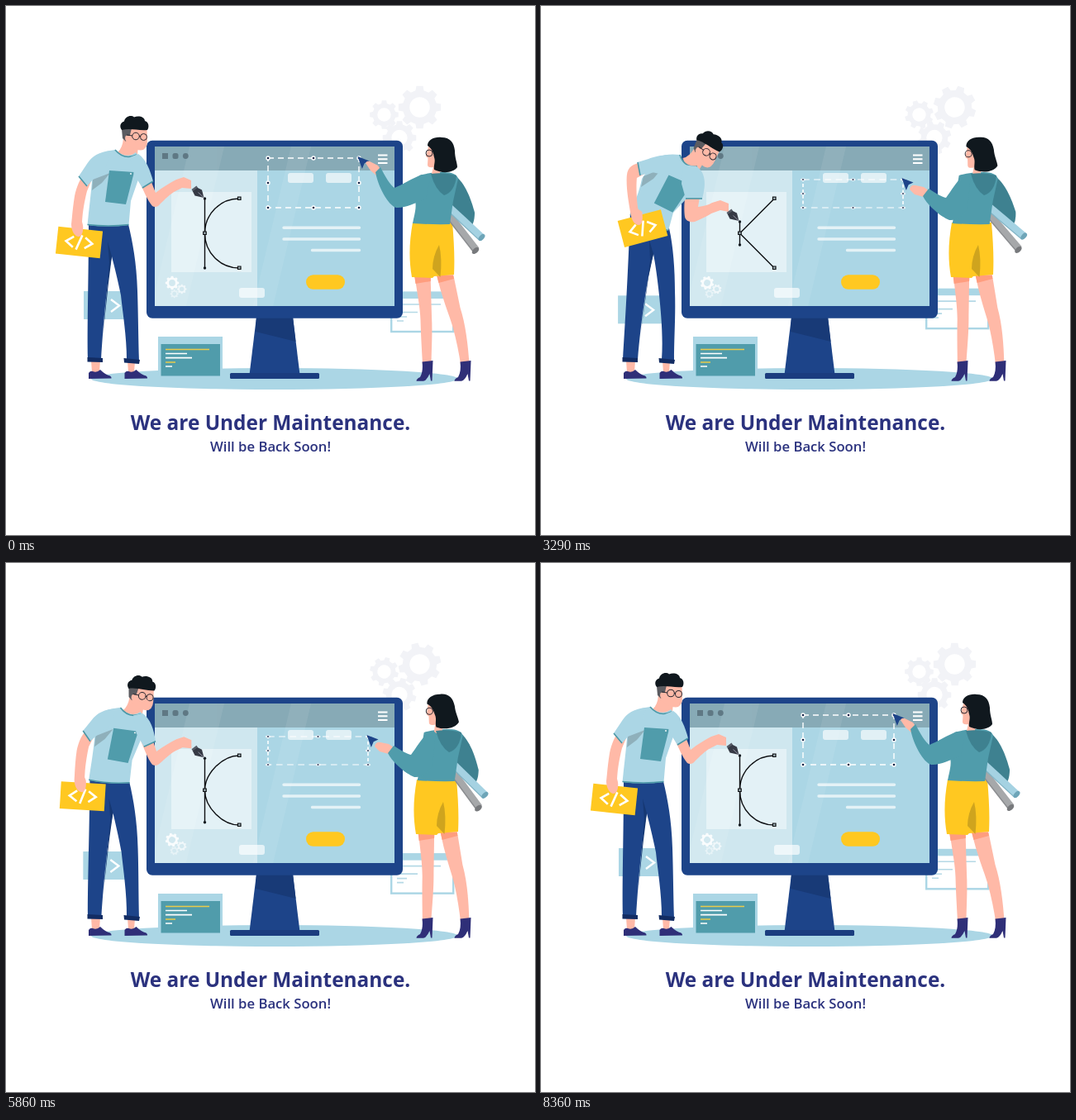
An HTML page that plays this animation: 640 by 640 pixels, repeating every 8430 ms.

```html
<!DOCTYPE html>
<html lang="en">
<head>
<meta charset="utf-8">
<title>Under maintenance</title>
<style>
  html, body { margin: 0; width: 100%; height: 100%; overflow: hidden; background: #fff; }
  svg { display: block; width: 100vw; height: 100vh; }
  text { font-family: "Open Sans", "Noto Sans", sans-serif; fill: #2b327e; text-anchor: middle; }
  .skin { fill: #ffb9a7; }
  .pale { fill: #abd6e5; }
  .teal { fill: #509cab; }
  .dusk { fill: #3e8190; }
  .navy { fill: #1d4489; }
  .gold { fill: #ffc821; }
  .ink { fill: #10181e; }
  .shoe { fill: #2f2f78; }
  .trim { fill: none; stroke: #4b97a6; stroke-width: 1.6; }
  .white { fill: none; stroke: #fff; }
  .pen { fill: none; stroke: #0d0f12; stroke-width: 1.4; }
  .glasses { fill: none; stroke: #2b2b33; }
</style>
</head>
<body>
<svg viewBox="0 0 640 640">
  <g id="backGears" fill="#f2f3f7"></g>

  <g id="codeCard">
    <rect class="pale" x="94" y="345" width="56" height="34"/>
    <path class="white" stroke-width="2.4" d="M127 355L137 362.5L127 370"/>
  </g>
  <g id="page">
    <rect x="466.2" y="347" width="75" height="47" fill="#fff" stroke="#abd6e5" stroke-width="2.4"/>
    <rect class="pale" x="465" y="345.5" width="77.4" height="8.5"/>
    <path d="M473 361H526M473 370.5H498M473 376H485M473 381H481" stroke="#b5d9e6" stroke-width="1.6"/>
  </g>

  <ellipse class="pale" cx="325" cy="451" rx="222" ry="13"/>

  <!-- stand and terminal -->
  <path class="navy" d="M303 376H347L355.5 446H294.5Z"/>
  <path fill="#183a77" d="M303 376H347L350.5 406L302 394Z"/>
  <rect x="271" y="444" width="108" height="7" rx="1.5" fill="#1b3d7f"/>
  <rect class="pale" x="184" y="400" width="78" height="50"/>
  <rect class="teal" x="187.5" y="409" width="71.5" height="38.5"/>
  <path d="M193 415.5H246M193 431H205" stroke="#e9cb4a" stroke-width="1.7"/>
  <path class="white" stroke-width="1.7" d="M193 420.5H219M193 425.7H225M193 436H201"/>

  <!-- screen -->
  <rect class="navy" x="170" y="162.7" width="310" height="215" rx="7"/>
  <rect class="pale" x="180" y="170" width="290" height="193"/>
  <rect x="180" y="199" width="124" height="164" fill="#cfe7ef"/>
  <rect x="180" y="170" width="290" height="29" fill="#87aab6"/>
  <g fill="#fff" opacity=".08">
    <path d="M222 170H264L218 363H180V346Z"/>
    <path d="M345 170H369L323 363H299Z"/>
  </g>
  <g fill="#5f7884">
    <rect x="189" y="178" width="7" height="7"/>
    <rect x="201.5" y="178" width="7" height="7" rx="2.5"/>
    <circle cx="217.3" cy="181.5" r="3.4"/>
  </g>
  <path class="white" stroke-width="2" d="M450 180.5H461.5M450 185.2H461.5M450 190H461.5"/>
  <rect x="200" y="225" width="97" height="97" fill="#fff" opacity=".42"/>
  <g fill="#fff" opacity=".65">
    <rect x="341" y="202" width="31" height="12" rx="3"/>
    <rect x="387" y="202" width="31" height="12" rx="3"/>
    <rect x="282" y="341" width="31" height="12" rx="3"/>
  </g>
  <path class="white" stroke-width="3.4" stroke-linecap="round" opacity=".68" d="M336 268.3H427.5M336 282H427.5M370.5 295.5H427.5"/>
  <rect class="gold" x="363" y="325.3" width="47" height="17.5" rx="8.7"/>
  <g id="screenGears" fill="#fff"></g>

  <path class="pen" id="arc"/>
  <path class="pen" id="handle"/>
  <circle class="ink" id="knobTop" cx="240.5" r="1.7"/>
  <circle class="ink" id="knobBase" cx="240.5" r="1.7"/>
  <path d="M280.5 231h3.5v3.5h-3.5ZM280.5 315h3.5v3.5h-3.5ZM238.7 273h3.5v3.5h-3.5Z" fill="#9fb0b6" stroke="#0d0f12" stroke-width="1.2"/>
  <g id="marquee"></g>
  <path class="navy" id="cursor" d="M0 0L14 5.5L8.2 8.3L5.3 15Z"/>

  <!-- man; data-to holds the pose at the end of the move named by data-by -->
  <path class="skin" d="M103 429H114L113 443H104ZM147 430H156L155 443H148Z"/>
  <g class="shoe">
    <path id="shoe" d="M100 451V444Q102 441 105 442Q110 444 114 440Q120 446 126 447.5Q128 449 127.5 450.5Z"/>
    <use href="#shoe" x="43.5"/>
  </g>
  <path class="navy" data-by="lean"
    d="M100 264L148 264C153 285 158 310 159 345C160 375 160 400 161 430L146 428C146 400 141 370 139 350C135 330 131 315 128 303C122 335 118 380 115 428L99 428C98 390 100 330 100 264Z"
    data-to="M108 250L155 269C160 290 162 320 162 345C163 375 161 400 161 430L146 428C148 400 145 370 143 350C141 330 138 310 136 300C129 325 121 380 117 428L99 428C102 380 105 330 108 250Z"/>
  <path fill="#163873" data-by="lean" d="M123 285L128 303L124 335L117 400L125 310Z" data-to="M131 283L136 300L130 328L120 400L132 308Z"/>
  <path fill="#122c63" d="M98.5 425L117 426V431L98.5 430.5ZM142.5 426L162 428L161 433L143 431.5Z"/>
  <path class="skin" data-by="draw"
    d="M160 210C166 222 171 235 177 242C180 244 184 243 186 240C192 234 199 227 205 224L213 220L224 221L224 211L215 207L206 210C198 214 190 219 181 226L174 208Z"
    data-to="M175 226C173 238 173 248 174 255C175 260 180 262 186 261C194 258 201 254 206 251L217 247L227 249L227 239L217 235L207 238C202 241 197 242 190 243L193 226Z"/>
  <g id="nib" fill="#363a45">
    <path d="M0 0L-11 -2.5L-14 -8.5L-8.5 -12.5L-2.5 -9.5Z"/>
    <path d="M-15 -10L-9 -14.5L-7.5 -12.3L-13.5 -8Z" fill="#565b66"/>
    <path d="M0 0L-7 -6.5" stroke="#aab" stroke-width=".8"/>
  </g>
  <g id="manHead">
    <path class="skin" d="M142 160L160 168L159 180Q147 190 135 177Q141 172 142 160Z"/>
    <path class="skin" d="M145 147L170.5 149L171 163Q171 174 163 174.5Q150 174 145 164Z"/>
    <path d="M140 149L152 148L150 156L147 158L145 164L141 160Z" fill="#5b5b60"/>
    <ellipse class="skin" cx="146.5" cy="160" rx="2.4" ry="3.4"/>
    <path class="ink" d="M140 150C137 146 138 141 143 139.5C144 134 151 131 155 134.5C160 132 168 134 168 139C173 140 173.5 147 171 150C160 151 150 147.5 140 150Z"/>
    <path class="glasses" d="M146 156L153 157M161 157.5H163"/>
    <circle class="glasses" cx="157" cy="157.5" r="4.3"/>
    <circle class="glasses" cx="166.5" cy="158.5" r="4"/>
  </g>
  <path class="pale" data-by="lean"
    d="M132 174C124 175 115 177 108 183L104 212C102 235 100 250 98.5 265Q124 268 148.5 265L151 236L160 210L167 190L157 177Q146 186 132 174Z"
    data-to="M168 180C160 179 150 179 140 183L122 209C119 225 113 238 108 252Q128 268 154 272L160 250L177 232L196 208L189 194Q176 198 168 180Z"/>
  <path fill="#8fb0bb" data-by="lean" d="M104 223L105 210L126 202L116 214Z" data-to="M121 219L124 206L146 197L136 209Z"/>
  <path class="trim" data-by="lean" d="M132 174Q143 187 158 180" data-to="M168 180Q173 196 189 194"/>
  <path class="trim" data-by="lean" d="M98.5 264.5Q124 267.5 148.5 264.5" data-to="M108 252Q128 268 154 271.5"/>
  <g id="print">
    <path class="teal" d="M125 199L155 201L145 240L120 237Z"/>
    <circle cx="151" cy="203" r=".9" fill="#fff"/>
  </g>
  <path class="pale" data-by="lean"
    d="M150 183L160 179C170 186 174 198 178 212L165 220L155 204Z"
    data-to="M172 192L188 194C199 201 200 215 195 233L175 233L170 215Z"/>
  <path class="trim" data-by="lean" d="M178 212L165 220" data-to="M195 233L175 233"/>
  <g id="card">
    <rect class="gold" x="-27" y="-16.5" width="54" height="33"/>
    <path class="white" stroke-width="2.6" d="M-7 -6.5L-16 0L-7 6.5M3 -9L-3 9M7 -6.5L16 0L7 6.5"/>
  </g>
  <path class="skin" data-by="carry"
    d="M96 204C90 206 85 220 83 230C81 242 80 255 79 264C79 272 83 279 88 279C92 279 94 272 93 265L92 261C93 245 96 232 98 224L103 212Z"
    data-to="M126 188C112 190 106 193 105 204C104 220 108 238 110 250C111 258 115 265 121 264C125 263 125 254 124 248L119 245C117 235 116 218 117 207L128 202Z"/>
  <path class="pale" data-by="lean"
    d="M128 175C112 176 104 182 98 191L88 206L98 218L107 208L120 196Z"
    data-to="M164 181C150 179 138 182 130 185L117 189L120 205L134 201L148 204Z"/>
  <path class="trim" data-by="lean" d="M88 206L98 218" data-to="M117 189L120 205"/>

  <!-- woman -->
  <g id="legs">
    <path class="skin" d="M494 324C498 350 501 365 501.5 380C502 400 503 415 504 433H514.5C515 410 516 395 515 375L513.5 324ZM521 324C526 350 537 375 541 390C545 405 548 420 550 433H560.5C559 410 556 385 549.5 365L541 324Z"/>
    <path fill="#ff9d7e" d="M494 326H514L513.8 333L495.5 336ZM521 326H541L542 330L523.5 335Z"/>
  </g>
  <g class="shoe">
    <path id="boot" d="M503.5 430.5L516.5 429L515.5 453.5H514L512.5 445Q509 453 505 453.8H496.5Q496.5 451 501 449Q505 442 503.5 430.5Z"/>
    <use href="#boot" x="46"/>
  </g>
  <g id="shorts">
    <path class="gold" d="M492 262H540C542 285 543 305 542 325L518 327L516 329L491 328C487 305 488 285 492 262Z"/>
    <path d="M524 289Q516 303 516 318L525.5 328Q528 305 524 289Z" fill="#cfa41e"/>
  </g>
  <g id="body">
    <g id="rolls">
      <path class="dusk" d="M542 204C556 214 563 235 567 250Q567 260 564 265L540 243L534 225Z"/>
      <path d="M534 250L569 295" stroke="#a6a8aa" stroke-width="8.5"/>
      <path d="M531 253L566 298" stroke="#8b8d90" stroke-width="1.5"/>
      <ellipse cx="568" cy="296" rx="5" ry="3" fill="#77797c" transform="rotate(-40 568 296)"/>
      <path d="M536 243L576 280" stroke="#a5d2e2" stroke-width="8.5"/>
      <path d="M533 246.5L573 283.5" stroke="#7fb4c6" stroke-width="1.3"/>
      <ellipse cx="575.5" cy="280" rx="4.8" ry="2.8" fill="#6ea5b8" transform="rotate(-46 575.5 280)"/>
    </g>
    <path class="teal" d="M500 205C510 202 520 201 530 201C540 201 546 204 547 209L541 236L537 264Q514 264.5 492 263C494 252 497 245 495 235Z"/>
  </g>
  <path class="skin" data-by="aim"
    d="M435 190Q437 186 442 189L450 193L455 200L448 205L441 199Z"
    data-to="M446 222Q447 216 453 217L463 219L470 224L463 231L452 228Z"/>
  <path class="teal" data-by="aim"
    d="M447 201L453 195C458 205 465 217 470 220C480 216 492 208 503 204L514 204L508 234C495 238 482 245 472 244C462 241 450 218 447 201Z"
    data-to="M462 230L469 221C475 225 485 231 490 232C496 224 503 212 510 206L520 204L516 246C510 254 503 260 494 259C484 255 468 242 462 230Z"/>
  <g id="womanHead">
    <path class="skin" d="M511 170L526 174L525 205Q518 208 515 203L517 195Q510 196 510 192L510.5 184L508 182Z"/>
    <circle class="glasses" cx="512" cy="178" r="4"/>
    <path class="ink" d="M510 169C510 162 518 158 527 159C537 159 542 165 543 175C543 184 546 190 546 195C541 202 528 203 518 198C517 193 520 188 518 183C517 178 516 173 510 169Z"/>
  </g>
  <path class="dusk" id="hood" d="M514 203Q530 201 545 205Q543 225 530 229Q519 222 514 203Z"/>

  <text x="320" y="513" font-size="24.4" font-weight="700">We are Under Maintenance.</text>
  <text x="320" y="539.2" font-size="16.7" font-weight="600">Will be Back Soon!</text>
</svg>
<script>
const LOOP = 8430, STEP = LOOP / 118;
const $ = id => document.getElementById(id);
const set = (el, name, value) => el.setAttribute(name, value);
const move = (id, value) => set($(id), 'transform', value);

// Timing: share of a span, eased span, there-and-back, and a single hump.
const part = (t, a, b) => Math.min(1, Math.max(0, (t - a) / (b - a)));
const ease = (t, a, b) => { const u = part(t, a, b); return u * u * (3 - 2 * u); };
const trip = (t, a, b, c, d) => ease(t, a, b) - ease(t, c, d);
const hump = (t, a, b) => Math.sin(Math.PI * part(t, a, b)) ** 2;

// Each move is 0 in the first pose and 1 in the second.
const moves = {
  lean: t => .93 * trip(t, 0, 1400, 5150, 6050) + .07 * trip(t, 0, 3000, 6900, 8400),
  carry: t => .85 * trip(t, 0, 1500, 5150, 6050) + .15 * trip(t, 800, 5000, 5150, 6050),
  draw: t => trip(t, 0, 1300, 5150, 6050),
  aim: t => trip(t, 1500, 2600, 6900, 8000) - .08 * hump(t, 0, 2000),
  resize: t => trip(t, 1700, 2750, 6900, 8000) - .13 * hump(t, 0, 2000)
};

// Paths that bend: both poses share one structure.
const numbers = d => d.match(/[\d.]+/g).map(Number);
const bends = [...document.querySelectorAll('[data-to]')].map(el => ({
  el, by: el.dataset.by, d: el.getAttribute('d'), from: numbers(el.getAttribute('d')), to: numbers(el.dataset.to)
}));
function bend({ el, d, from, to }, p) {
  let i = 0;
  set(el, 'd', d.replace(/[\d.]+/g, () => (from[i] + (to[i++] - from[i - 1]) * p).toFixed(2)));
}

function gearPath(R, hole, teeth = 8) {
  const pitch = 2 * Math.PI / teeth, pts = [];
  for (let i = 0; i < teeth; i++) {
    for (const off of [-.31, -.2, .2, .31]) {
      const a = (i + off) * pitch, r = Math.abs(off) < .3 ? R : R * .8;
      pts.push(`${r * Math.sin(a)} ${-r * Math.cos(a)}`);
    }
  }
  const half = `A${hole} ${hole} 0 1 0 `;
  return `M${pts.join('L')}ZM${hole} 0${half}${-hole} 0${half}${hole} 0Z`;
}
const gears = [];
function addGear(parent, x, y, R, dir, opacity = 1) {
  $(parent).insertAdjacentHTML('beforeend',
    `<path d="${gearPath(R, R * .47)}" fill-rule="evenodd" opacity="${opacity}"/>`);
  gears.push({ el: $(parent).lastElementChild, x, y, dir });
}
addGear('backGears', 500.5, 122.5, 26, 1);
addGear('backGears', 457.5, 131.5, 17.5, -1);
addGear('backGears', 476, 159.5, 20.5, -1);
addGear('screenGears', 201, 335, 8.3, 1, .85);
addGear('screenGears', 212.7, 342.5, 5.8, -1, .65);
addGear('screenGears', 203.7, 348.2, 5.2, -1, .45);

let frame = '<path class="white" stroke-width="1.4" stroke-dasharray="7 5" d="M317 184H427V244H317Z"/>';
for (let i = 0; i < 9; i++) {
  if (i === 4) continue;
  const at = `cx="${317 + 55 * (i % 3)}" cy="${184 + 30 * Math.floor(i / 3)}"`;
  frame += `<circle ${at} r="2.7" fill="#fff"/><circle ${at} r="1.3" fill="#17264a"/>`;
}
$('marquee').innerHTML = frame;

function render(t) {
  const turn = t / LOOP, wave = 2 * Math.PI * turn;
  const now = {};
  for (const name in moves) now[name] = moves[name](t);
  const { lean, carry, draw, aim, resize } = now;
  for (const b of bends) bend(b, now[b.by]);

  for (const g of gears) set(g.el, 'transform', `translate(${g.x} ${g.y}) rotate(${g.dir * 45 * turn})`);
  move('codeCard', `translate(${.5 * Math.cos(wave) - .5} ${3 - 3 * Math.cos(wave)})`);
  move('page', `translate(0 ${-6 * Math.sin(wave)})`);

  // The handle shrinks while the semicircle collapses to two straight lines.
  const open = 1 - draw, h = 14 + 28 * open, k = 23.2 * open;
  set($('arc'), 'd', `M282.3 233C${282.3 - k} 233 240.5 ${275 - k} 240.5 275C240.5 ${275 + k} ${282.3 - k} 317 282.3 317`);
  set($('handle'), 'd', `M240.5 ${275 - h}V${275 + h}`);
  set($('knobTop'), 'cy', 275 - h);
  set($('knobBase'), 'cy', 275 + h);
  move('nib', `translate(239.5 ${274 - h})`);

  const x = 427 + 11 * resize, y = 184 + 26 * resize;
  move('marquee', `translate(317 244) scale(${(x - 317) / 110} ${(244 - y) / 60}) translate(-317 -244)`);
  move('cursor', `translate(${x - 1.5} ${y - 2})`);

  move('print', `translate(${22 * lean} ${8 * lean}) rotate(${20 * lean} 136 219)`);
  move('manHead', `translate(${42 * lean} ${18.5 * lean}) rotate(${27 * lean} 156 160)`);
  move('card', `translate(${88.5 + 36.5 * carry} ${286 - 17 * carry * (2 - carry)}) rotate(${6 - 22 * carry})`);

  const nod = hump(t, 3300, 6860);
  move('legs', `translate(${18.92 * aim} 0) matrix(1 0 ${-.044 * aim} 1 0 0)`);
  move('shorts', `translate(${5 * aim} 0)`);
  move('body', `translate(${5.7 * aim} 0)`);
  move('hood', `translate(${6 * aim} 0)`);
  move('rolls', `rotate(${3 * hump(t, 5000, 8360) - 5.5 * hump(t, 1700, 3800)} 545 215)`);
  move('womanHead', `translate(${7 * aim - 3 * hump(t, 0, 2000) - 7 * nod} 0) rotate(${-4.5 * trip(t, 0, 1000, 5500, 6800) - 4 * nod} 522 202)`);
}

const start = performance.now();
function tick() {
  const t = (performance.now() - start) % LOOP;
  render(Math.floor(t / STEP) * STEP);
  requestAnimationFrame(tick);
}
render(0);
requestAnimationFrame(tick);
</script>
</body>
</html>
```
